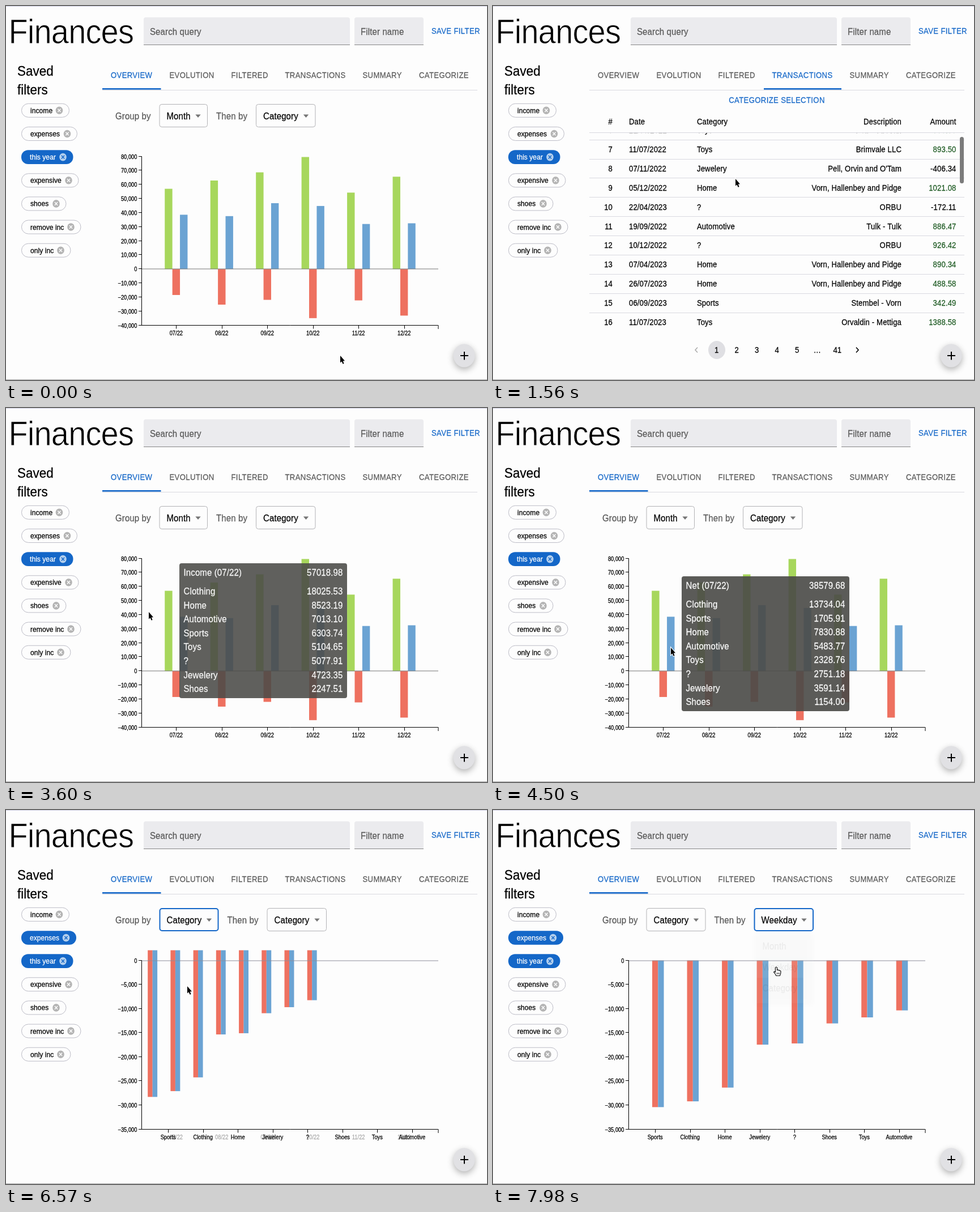
These frames come from a looping animation (849x660 px, 8000 ms). An HTML page with a canvas:

```html
<!DOCTYPE html>
<html lang="en">
<head>
<meta charset="utf-8">
<title>Finances</title>
<style>
html, body { margin: 0; width: 100%; height: 100%; overflow: hidden; background: #fdfdfd; }
canvas { display: block; }
</style>
</head>
<body>
<canvas id="stage" width="849" height="660"></canvas>
<script>
const ctx = document.getElementById('stage').getContext('2d');
const LOOP = 8000;
const SX = 0.935, SY = 1.027; // screen pixels per layout pixel
const INK = '#000', SOFT = '#595959', BLUE = '#1467c8', RULE = '#d9d9e0', PAPER = '#fdfdfd';
const SERIES = ['#a7d75c', '#ee7160', '#6ba3d3'];

const clamp = u => Math.max(0, Math.min(1, u));
const lerp = (a, b, u) => a + (b - a) * u;
const span = (t, a, b) => clamp((t - a) / (b - a));
const easeOut = u => 1 - (1 - u) ** 3;
const easeInOut = u => u * u * (3 - 2 * u);

// Interpolates [time, ...values] keys.
function track(keys, t) {
  let i = 0;
  while (i < keys.length - 1 && keys[i + 1][0] <= t) i++;
  const a = keys[i], b = keys[Math.min(i + 1, keys.length - 1)];
  const u = a === b ? 0 : easeInOut(span(t, a[0], b[0]));
  return a.slice(1).map((v, k) => lerp(v, b[k + 1], u));
}

// A hairline in the edge colour makes the strokes heavier, or lighter when it is the paper.
function text(s, x, y, size, color = INK, align = 'left', spacing = 0, edge = color, line = 0.25) {
  ctx.save();
  ctx.translate(x, y);
  ctx.scale(SX, SY);
  ctx.font = `${size}px "Liberation Sans", Arial, sans-serif`;
  ctx.letterSpacing = spacing * size + 'px';
  ctx.textAlign = align;
  ctx.fillStyle = color;
  ctx.fillText(s, 0, 0);
  ctx.strokeStyle = edge;
  ctx.lineWidth = line;
  ctx.lineJoin = 'round';
  ctx.strokeText(s, 0, 0);
  ctx.restore();
}

function rect(x, y, w, h, color) {
  ctx.fillStyle = color;
  ctx.fillRect(x, y, w, h);
}

function round(x, y, w, h, r, fill, stroke, line = 1) {
  ctx.beginPath();
  ctx.roundRect(x, y, w, h, r);
  if (fill) { ctx.fillStyle = fill; ctx.fill(); }
  if (stroke) { ctx.strokeStyle = stroke; ctx.lineWidth = line; ctx.stroke(); }
}

function oval(x, y, rx, ry, color) {
  ctx.beginPath();
  ctx.ellipse(x, y, rx, ry, 0, 0, 7);
  ctx.fillStyle = color;
  ctx.fill();
}

function path(points, stroke, line = 1) {
  ctx.beginPath();
  points.forEach(([x, y]) => ctx.lineTo(x, y));
  ctx.strokeStyle = stroke;
  ctx.lineWidth = line;
  ctx.stroke();
}

function polygon(points, fill) {
  ctx.beginPath();
  points.forEach(([x, y]) => ctx.lineTo(x, y));
  ctx.closePath();
  ctx.fillStyle = fill;
  ctx.fill();
}

function shadowed(blur, dy, alpha, draw) {
  ctx.save();
  ctx.shadowColor = `rgba(0,0,0,${alpha})`;
  ctx.shadowBlur = blur;
  ctx.shadowOffsetY = dy;
  draw();
  ctx.restore();
}

// Moments of the session
const OPEN_TABLE = 650, OPEN_CHART = 2420, FILTER = 5200;
const MENU1 = [5650, 6300], REGROUP = 6440, MENU2 = [7000, 7810];
const ENTER = 440;

// ---------- frame of the page ----------
const TABS = [['OVERVIEW', 185], ['EVOLUTION', 288.5], ['FILTERED', 397.5],
  ['TRANSACTIONS', 492.5], ['SUMMARY', 629.5], ['CATEGORIZE', 729]];
const CHIPS = [['income', 112], ['expenses', 126], ['this year', 120.5], ['expensive', 128.5],
  ['shoes', 106.5], ['remove inc', 132.5], ['only inc', 114.5]];

function drawHeader() {
  text('Finances', 4.5, 66, 60, INK, 'left', -0.01562, PAPER, 0.9);
  for (const [label, x, w] of [['Search query', 243, 364], ['Filter name', 615, 122]]) {
    round(x, 20, w, 49, [4, 4, 0, 0], '#ebebee');
    rect(x, 68, w, 1, '#858585');
    text(label, x + 11, 50.5, 16, SOFT, 'left', 0.00938);
  }
  text('SAVE FILTER', 751, 49, 14, BLUE, 'left', 0.02857);
}

function drawChip(label, right, y, on) {
  const r = on ? right - 2 : right;
  if (on) round(27, y - 12.3, r - 27, 24.6, 12, BLUE);
  else round(27.5, y - 12, r - 28, 24, 12, null, '#bcbcc6');
  text(label, on ? 42 : 43, y + 4.5, 13, on ? '#fff' : INK);
  const x = r - 18;
  oval(x, y, 6.3, 6.8, on ? '#b4d0ee' : '#b4b4b4');
  const ink = on ? BLUE : PAPER;
  path([[x - 2.6, y - 2.8], [x + 2.6, y + 2.8]], ink, 1.4);
  path([[x - 2.6, y + 2.8], [x + 2.6, y - 2.8]], ink, 1.4);
}

function drawSidebar(t) {
  text('Saved', 20, 122.5, 24);
  text('filters', 20, 155.5, 24);
  CHIPS.forEach(([label, right], i) =>
    drawChip(label, right, 184.3 + i * 41.15, i === 2 || (i === 1 && t >= FILTER)));
}

function drawTabs(t) {
  rect(170, 148, 662, 1, RULE);
  const active = t >= OPEN_TABLE && t < OPEN_CHART ? 3 : 0;
  TABS.forEach(([label, x], i) =>
    text(label, x, 127, 14, i === active ? BLUE : SOFT, 'left', 0.02857));
  const u = easeInOut(span(t, OPEN_TABLE, OPEN_TABLE + 300)) - easeInOut(span(t, OPEN_CHART, OPEN_CHART + 300));
  const left = lerp(170, 478, u);
  rect(left, 145, lerp(273.5, 615, u) - left, 2.6, BLUE);
}

function drawAddButton() {
  shadowed(12, 4, 0.3, () => oval(808.7, 617, 19, 20.5, '#e1e1e4'));
  rect(802, 616, 14, 2, INK);
  rect(808, 610, 2, 14.4, INK);
}

// ---------- transactions ----------
const ROWS = `14/03/2023|Home|Tarvel Group|612.30
02/09/2022|Shoes|Tulk - Tulk|-218.45
28/01/2023|Sports|Brimvale LLC|734.92
19/10/2022|Clothing|Stembel Group|1105.67
06/05/2023|Home|ORBU|-95.20
21/08/2022|Toys|Pell - Strovan|508.36
11/07/2022|Toys|Brimvale LLC|893.50
07/11/2022|Jewelery|Pell, Orvin and O'Tam|-406.34
05/12/2022|Home|Vorn, Hallenbey and Pidge|1021.08
22/04/2023|?|ORBU|-172.11
19/09/2022|Automotive|Tulk - Tulk|886.47
10/12/2022|?|ORBU|926.42
07/04/2023|Home|Vorn, Hallenbey and Pidge|890.34
26/07/2023|Home|Vorn, Hallenbey and Pidge|488.58
06/09/2023|Sports|Stembel - Vorn|342.49
11/07/2023|Toys|Orvaldin - Mettiga|1388.58
26/11/2022|Toys|Orvaldin - Mettiga|751.74
09/07/2022|Clothing|Dunterlow and Sons|891.55
17/02/2023|Toys|Pell - Strovan|-463.57
19/06/2023|Automotive|Tarvel Group|46.91
17/06/2023|Home|Kelvor, Domagrine and Hostam|-496.77
12/04/2023|Home|Stembel Group|1164.78`.split('\n').map(r => r.split('|'));
const ROW = 33.9;
const SCROLL = [[1150, 0], [1560, 191], [1660, 200], [2080, 386]];

function drawRow(cells, y, head) {
  const cell = (i, x, align, color) => text(cells[i], x, y + 5, 14, color, align, 0.01071);
  cell(0, 211, 'right');
  cell(1, 240);
  cell(2, 360);
  cell(3, 721, 'right');
  cell(4, 817.5, 'right', head || cells[4][0] === '-' ? INK : '#1d5a22');
}

function drawTable(t) {
  text('CATEGORIZE SELECTION', 501, 171, 14, BLUE, 'center', 0.02857);
  drawRow(['#', 'Date', 'Category', 'Description', 'Amount'], 203.5, true);
  const [scroll] = track(SCROLL, t);
  ctx.save();
  ctx.beginPath();
  ctx.rect(170, 224, 662, 351);
  ctx.clip();
  ROWS.forEach((row, i) => {
    const y = 240.6 + i * ROW - scroll;
    drawRow([String(i + 1), ...row], y);
    rect(170, Math.round(y + 16.6), 662, 1, RULE);
  });
  ctx.restore();
  rect(170, 223, 662, 1, RULE);
  ctx.globalAlpha = span(t, 1080, 1180) * (1 - span(t, 2150, 2330));
  round(824, 188 + scroll * 0.225, 7, 82, 3.5, '#7b7b7b');
  ctx.globalAlpha = 1;

  oval(395, 607, 15, 16, '#dfdfe3');
  ['1', '2', '3', '4', '5', '…', '41'].forEach((s, i) => text(s, 394.7 + i * 35.5, 611.5, 14, INK, 'center'));
  path([[361, 602.5], [357, 607], [361, 611.5]], '#a9a9a9', 1.5);
  path([[641, 602.5], [645, 607], [641, 611.5]], INK, 1.6);
}

// ---------- chart ----------
const MONTHS = ['07/22', '08/22', '09/22', '10/22', '11/22', '12/22'];
const CATEGORIES = ['Sports', 'Clothing', 'Home', 'Jewelery', '?', 'Shoes', 'Toys', 'Automotive'];
const income = [57.02, 62.9, 68.7, 79.6, 54.3, 65.6];
const expense = [-18.44, -25.3, -21.9, -34.9, -22.3, -33.1];
const net = [38.58, 37.6, 46.8, 44.8, 32, 32.5];
const spent = [-30.4, -29.2, -26.35, -17.45, -17.2, -13.05, -11.8, -10.35];
const VIEWS = {
  all: { names: MONTHS, data: [income, expense, net], top: 80, low: -40, step: 10 },
  filtered: { names: MONTHS, data: [null, expense, expense], top: 0, low: -35, step: 5 },
  grouped: { names: CATEGORIES, data: [null, spent, spent], top: 0, low: -35, step: 5 }
};

const yOf = (view, v) => 265.5 + (view.top - v) / (view.top - view.low) * 298;

function barOf(view, s, i) {
  const step = 523 / (view.names.length + 0.5);
  const v = view.data[s] ? view.data[s][i] : 0;
  const a = yOf(view, Math.max(v, 0)), b = yOf(view, Math.min(v, 0));
  return [240 + step * (i + 0.5 + s / 6), a, step / 6, b - a];
}

function drawBars(view, from, u) {
  for (let s = 0; s < 3; s++) {
    if (!view.data[s] && !(from && from.data[s])) continue;
    view.names.forEach((_, i) => {
      const goal = barOf(view, s, i);
      const start = from ? barOf(from, s, i) : [187 + 5 * s, goal[1] - 52, 5.2, goal[3]];
      rect(...goal.map((v, k) => lerp(start[k], v, u)), SERIES[s]);
    });
  }
}

function drawNames(names, color) {
  const step = 523 / (names.length + 0.5);
  names.forEach((name, i) => text(name, 240 + step * (i + 0.75), 580.5, 10, color, 'center'));
}

function drawAxes(view) {
  const zero = yOf(view, 0);
  rect(240, Math.round(zero) - 0.5, 523, 1, view.top ? '#777' : '#8d8d9c');
  path([[234, 265.5], [239.5, 265.5], [239.5, 563.5], [234, 563.5]], INK);
  path([[239.5, 563.5], [763, 563.5], [763, 570]], INK);
  for (let v = view.top; v >= view.low; v -= view.step) {
    const y = Math.round(yOf(view, v)) - 0.5;
    path([[234, y], [239.5, y]], INK);
    const label = v ? (v < 0 ? '−' : '') + Math.abs(v) + ',000' : '0';
    text(label, 231.5, y + 4, 10, INK, 'right');
  }
  const step = 523 / (view.names.length + 0.5);
  view.names.forEach((_, i) => {
    const x = Math.round(240 + step * (i + 0.75)) + 0.5;
    path([[x, 563.5], [x, 569.5]], INK);
  });
  drawNames(view.names, INK);
}

function drawChart(t) {
  const view = t < FILTER ? VIEWS.all : t < REGROUP ? VIEWS.filtered : VIEWS.grouped;
  const begin = t < OPEN_TABLE ? -ENTER : t < FILTER ? OPEN_CHART : t < REGROUP ? FILTER : REGROUP;
  const u = easeOut(span(t, begin, begin + ENTER));
  const from = view === VIEWS.filtered ? VIEWS.all : null;
  if (view === VIEWS.grouped) {
    ctx.globalAlpha = 1 - u;
    drawNames(MONTHS, '#333');
    ctx.globalAlpha = 1;
  }
  drawBars(view, from, u);
  drawAxes(view);
}

// ---------- selects ----------
function drawSelect(x, w, value, focus) {
  if (focus) round(x + 1, 174, w - 2, 39, 4, null, BLUE, 2);
  else round(x + 0.5, 173.5, w - 1, 40, 4, null, '#b3b3b6');
  text(value, x + 13, 199.5, 16, INK, 'left', 0.00938);
  const c = x + w - 17;
  polygon([[c - 4.7, 191.5], [c + 4.7, 191.5], [c, 197]], '#757575');
}

function drawMenu(x, w, [open, close], chosen, t, mouseY) {
  if (t < open || t > close + 190) return;
  const grow = easeOut(span(t, open, open + 220));
  ctx.save();
  ctx.globalAlpha = grow * (1 - span(t, close, close + 180));
  ctx.translate(x + w / 2, 214);
  ctx.scale(lerp(0.75, 1, grow), lerp(0.56, 1, grow));
  ctx.translate(-x - w / 2, -214);
  shadowed(10, 4, 0.28, () => round(x, 214, w, 127, 4, '#fff'));
  ['Month', 'Weekday', 'Category'].forEach((item, i) => {
    const y = 222 + i * 37;
    const hover = mouseY >= y && mouseY < y + 37;
    if (item === chosen) rect(x, y, w, 37, '#e6eef9');
    else if (hover) rect(x, y, w, 37, '#f2f2f4');
    text(item, x + 15, y + 24, 16, INK, 'left', 0.00938);
  });
  ctx.restore();
}

function selects(t) {
  const grouped = t >= MENU1[1];
  const w = grouped ? 105 : 85.5;
  return { w, x: 270.5 + w + 85, first: grouped ? 'Category' : 'Month', second: t >= MENU2[1] ? 'Weekday' : 'Category' };
}

function drawSelects(t) {
  const s = selects(t);
  text('Group by', 193, 199.5, 16, SOFT, 'left', 0.00938);
  drawSelect(270.5, s.w, s.first, t >= MENU1[0] && t < MENU2[0]);
  text('Then by', 285.5 + s.w, 199.5, 16, SOFT, 'left', 0.00938);
  drawSelect(s.x, 105.5, s.second, t >= MENU2[0]);
}

// ---------- tooltip ----------
const EARNED = { Clothing: 18025.53, Home: 8523.19, Automotive: 7013.10, Sports: 6303.74,
  Toys: 5104.65, '?': 5077.91, Jewelery: 4723.35, Shoes: 2247.51 };
const KEPT = { Clothing: 13734.04, Sports: 1705.91, Home: 7830.88, Automotive: 5483.77,
  Toys: 2328.76, '?': 2751.18, Jewelery: 3591.14, Shoes: 1154.00 };
const COST = Object.fromEntries(['Sports', 'Clothing', 'Toys', '?', 'Automotive', 'Jewelery', 'Shoes', 'Home']
  .map(k => [k, KEPT[k] - EARNED[k]]));
const TIPS = [[2990, 3470, 'Income', EARNED], [3860, 4130, 'Expenses', COST], [4200, 4760, 'Net', KEPT]];

function drawTip(t) {
  const tip = TIPS.filter(([a]) => t >= a).pop();
  if (!tip) return;
  const [start, end, name, parts] = tip;
  const alpha = span(t, start, start + 100) * (1 - span(t, end + 125, end + 325));
  if (!alpha) return;
  const [mx, my] = track(MOUSE, Math.min(t, end));
  const x = mx + 19, y = my - 126;
  const line = (label, v, base) => {
    text(label, x + 7.5, base, 16, '#fff', 'left', 0.00938);
    text(v.toFixed(2), x + 288.5, base, 16, '#fff', 'right', 0.00938);
  };
  ctx.save();
  ctx.globalAlpha = alpha;
  round(x, y, 296, 238, 4, 'rgba(75,75,72,0.91)');
  line(name + ' (07/22)', Object.values(parts).reduce((a, b) => a + b), y + 21.5);
  Object.entries(parts).forEach(([label, v], i) => line(label, v, y + 55 + i * 24.6));
  ctx.restore();
}

// ---------- pointer ----------
const MOUSE = [[0, 590, 617], [120, 590, 617], [560, 545, 122], [720, 545, 122], [1120, 428, 305],
  [2080, 428, 305], [2340, 227, 114], [2480, 227, 114], [3050, 289, 385], [3470, 287, 400],
  [3570, 252, 360], [3630, 252, 360], [3920, 300, 485], [4080, 300, 485], [4300, 314, 423],
  [4740, 314, 423], [5120, 70, 224], [5260, 70, 224], [5580, 314, 192], [5720, 314, 192],
  [6150, 320, 311], [6640, 320, 311], [6920, 512, 192], [7080, 512, 192], [7500, 500, 277], [8000, 500, 277]];
const HANDS = [[540, 750], [2300, 2520], [5050, 5300], [5540, 6380], [6890, 8000]];

function drawArrow(x, y) {
  const shape = [[0, 0], [0, 12.6], [2.6, 10.2], [4.6, 14.8], [6.6, 13.9], [4.7, 9.5], [8, 9.2]]
    .map(([a, b]) => [x + a, y + b]);
  path([...shape, shape[0], shape[1]], '#fff', 2);
  polygon(shape, '#000');
}

function drawHand(x, y) {
  ctx.save();
  ctx.translate(x, y);
  ctx.beginPath();
  ctx.moveTo(-1.6, 9);
  ctx.lineTo(-1.6, 1.4);
  ctx.quadraticCurveTo(0, -1.4, 1.5, 1.4);
  ctx.lineTo(1.5, 5.5);
  ctx.quadraticCurveTo(3.2, 4.2, 4, 6);
  ctx.quadraticCurveTo(5.8, 5, 6.2, 6.8);
  ctx.quadraticCurveTo(8, 6.2, 8, 8.4);
  ctx.quadraticCurveTo(8, 12, 6.3, 15.5);
  ctx.lineTo(-0.2, 15.5);
  ctx.quadraticCurveTo(-1.4, 12.5, -4.4, 9.2);
  ctx.quadraticCurveTo(-4, 7, -1.6, 9);
  ctx.closePath();
  ctx.fillStyle = '#fff';
  ctx.fill();
  ctx.strokeStyle = '#111';
  ctx.lineWidth = 1.2;
  ctx.stroke();
  for (const k of [1.2, 3.2, 5.2]) path([[k, 10], [k, 13]], '#111', 0.8);
  ctx.restore();
}

function draw(t) {
  rect(0, 0, 849, 660, PAPER);
  drawHeader();
  drawSidebar(t);
  drawTabs(t);
  const [mx, my] = track(MOUSE, t);
  if (t >= OPEN_TABLE && t < OPEN_CHART) {
    drawTable(t);
  } else {
    drawSelects(t);
    drawChart(t);
    drawTip(t);
    const s = selects(t);
    drawMenu(270.5, s.w, MENU1, s.first, t, my);
    drawMenu(s.x, 105.5, MENU2, s.second, t, my);
  }
  drawAddButton();
  rect(0, 0, 849, 1, '#cfcfe4');
  rect(0, 659, 849, 1, '#a5a5a5');
  const hand = HANDS.some(([a, b]) => t >= a && t < b);
  (hand ? drawHand : drawArrow)(mx, my);
}

function tick() {
  draw(performance.now() % LOOP);
  requestAnimationFrame(tick);
}
tick();
</script>
</body>
</html>
```
